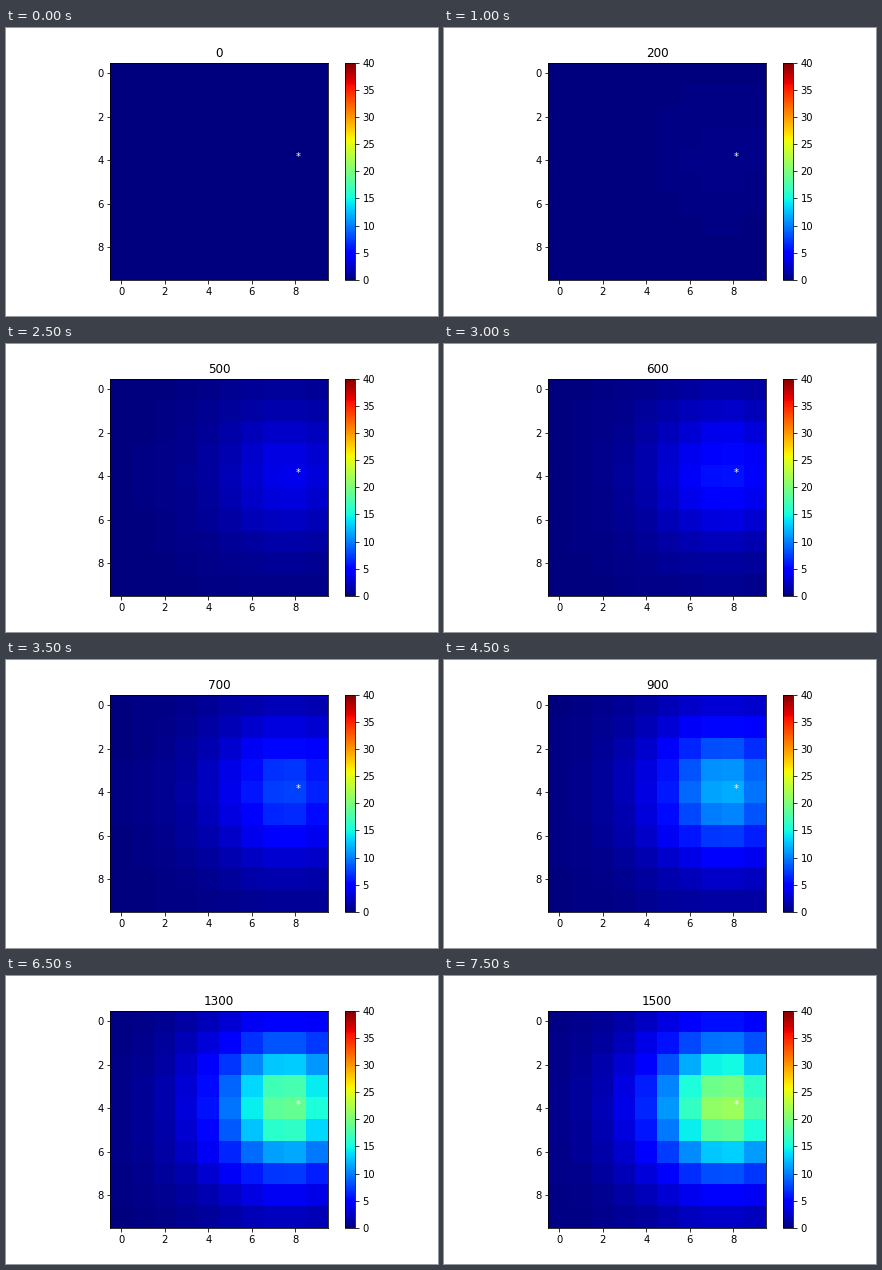
Write a matplotlib script that moves like this. It is 432 px wide and 288 px high and loops after 8 s.

```python
import numpy as np
import matplotlib.pyplot as plt
from matplotlib.animation import FuncAnimation

FRAMES, INTERVAL, STEP = 16, 500, 100
SIZE = 10

plt.rcParams.update({"font.family": "DejaVu Sans", "font.size": 10})


def hill(cx=7.6, cy=3.85, decay=.75, core=3.2):
    """Rounded top near the marked cell, exponential tails."""
    y, x = np.mgrid[:SIZE, :SIZE]
    dist = np.sqrt((x - cx) ** 2 + (y - cy) ** 2 + core ** 2) - core
    return np.exp(-decay * dist)


def peak(step, limit=32, half=1100, power=2.5):
    """Slow start, then saturating growth."""
    g = (step / half) ** power
    return limit * g / (1 + g)


HILL = hill()

fig, ax = plt.subplots(figsize=(6, 4), dpi=72, facecolor="white")
fig.subplots_adjust(left=.125, right=.9, bottom=.125, top=.88)
image = ax.imshow(HILL * peak(0), cmap="jet", vmin=0, vmax=40,
                  interpolation="nearest")
fig.colorbar(image, ax=ax, ticks=range(0, 41, 5))
ax.set_xticks(range(0, SIZE, 2))
ax.set_yticks(range(0, SIZE, 2))
ax.text(8, 4, "*", color="white")
title = ax.set_title("0", fontsize=12)


def update(i):
    step = i * STEP
    image.set_data(HILL * peak(step))
    title.set_text(str(step))
    return image, title


anim = FuncAnimation(fig, update, frames=FRAMES, interval=INTERVAL,
                     repeat=True, repeat_delay=0, blit=False)
plt.show()
```
